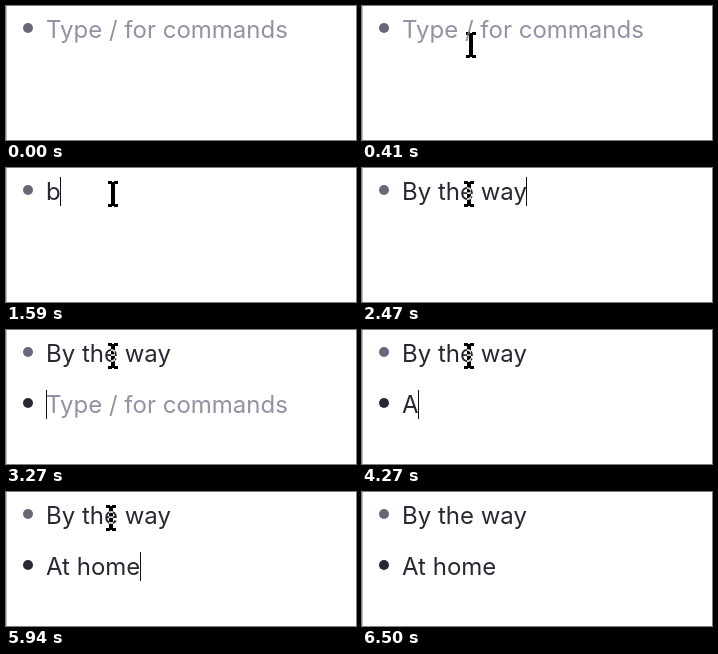
Write an HTML page that moves like this. It is 350x134 px and loops after 7100 ms.

```html
<!DOCTYPE html>
<html lang="en">
<head>
<meta charset="utf-8">
<title>Text shortcuts in a bullet list</title>
<style>
  html, body { margin: 0; width: 100%; height: 100%; overflow: hidden; background: #fff; }
  #stage {
    position: relative; width: 350px; height: 134px; overflow: hidden;
    background: #fff; font: 24px/29px Inter, sans-serif; color: #2a2735;
  }
  #stage::before { content: ""; position: absolute; width: 1px; height: 100%; background: #bdbdbd; }
  .row { position: absolute; left: 40px; top: 9px; height: 29px; white-space: pre; }
  .row + .row { top: 60px; }
  .row::before {
    content: ""; position: absolute; left: -23px; top: 8px;
    width: 10px; height: 10px; border-radius: 50%; background: #68687b;
  }
  .row + .row::before { background: #2a2637; }
  .empty { color: #9490a6; }
  .caret { position: absolute; top: 0; width: 1px; height: 29px; background: #111; }
  #pointer { position: absolute; left: 0; top: 0; mix-blend-mode: difference; }
</style>
</head>
<body>
<div id="stage">
  <div class="row"><span></span><i class="caret"></i></div>
  <div class="row"><span></span><i class="caret"></i></div>
  <svg id="pointer" width="10" height="26" fill="#fff" shape-rendering="crispEdges">
    <path d="M0 0H4V1H6V0H10V3H7V23H10V26H6V25H4V26H0V23H3V3H0Z"/>
  </svg>
</div>
<script>
  const LOOP = 7100, STEP = 70;
  const HINT = "Type / for commands";

  // [start ms, first line, second line (null = not there yet), line holding the caret (-1 = none)]
  const states = [
    [0, "", null, -1],
    [600, "", null, 0],
    [1130, "", null, -1],
    [1590, "b", null, 0],
    [1990, "bt", null, 0],
    [2470, "By the way", null, 0],
    [3000, "By the way", null, -1],
    [3270, "By the way", "", 1],
    [3870, "By the way", "", -1],
    [4270, "By the way", "A", 1],
    [4800, "By the way", "AH", 1],
    [4870, "By the way", "At home", 1],
    [5410, "By the way", "At home", -1],
    [5940, "By the way", "At home", 1],
    [6480, "By the way", "At home", -1]
  ];

  const rows = [...document.querySelectorAll(".row")].map(el => ({
    el, text: el.querySelector("span"), caret: el.querySelector(".caret")
  }));
  const pointer = document.getElementById("pointer");
  const mix = (a, b, p) => Math.round(a + (b - a) * p);
  let shown = null;

  function showState(state) {
    if (state === shown) return;
    shown = state;
    rows.forEach(({ el, text, caret }, i) => {
      const value = state[i + 1];
      el.style.display = value === null ? "none" : "";
      text.textContent = value || HINT;
      text.className = value ? "" : "empty";
      caret.style.display = state[3] === i ? "" : "none";
      const width = value ? text.getBoundingClientRect().width : 0;
      caret.style.left = Math.floor(width) + "px";
    });
  }

  function pointerAt(t) {
    if (t < 70 || t >= 6500) return null;
    if (t < 670) {
      const p = Math.min(1, Math.floor((t - 70) / STEP) / 7);
      const eased = 1 - (1 - p) ** 2;
      return [mix(107, 103, eased), mix(79, 14, eased)];
    }
    if (t < 930) return [103, 14];
    if (t < 5940) return [102, 13];
    const p = Math.floor((t - 5940) / STEP) / 7;
    return [mix(100, 296, p ** 1.5), mix(13, 118, p ** 1.5)];
  }

  function draw() {
    const t = performance.now() % LOOP;
    showState(states.findLast(s => s[0] <= t));
    const pos = pointerAt(t);
    pointer.style.display = pos ? "" : "none";
    if (pos) pointer.style.transform = `translate(${pos[0]}px, ${pos[1]}px)`;
    requestAnimationFrame(draw);
  }
  draw();
</script>
</body>
</html>
```
